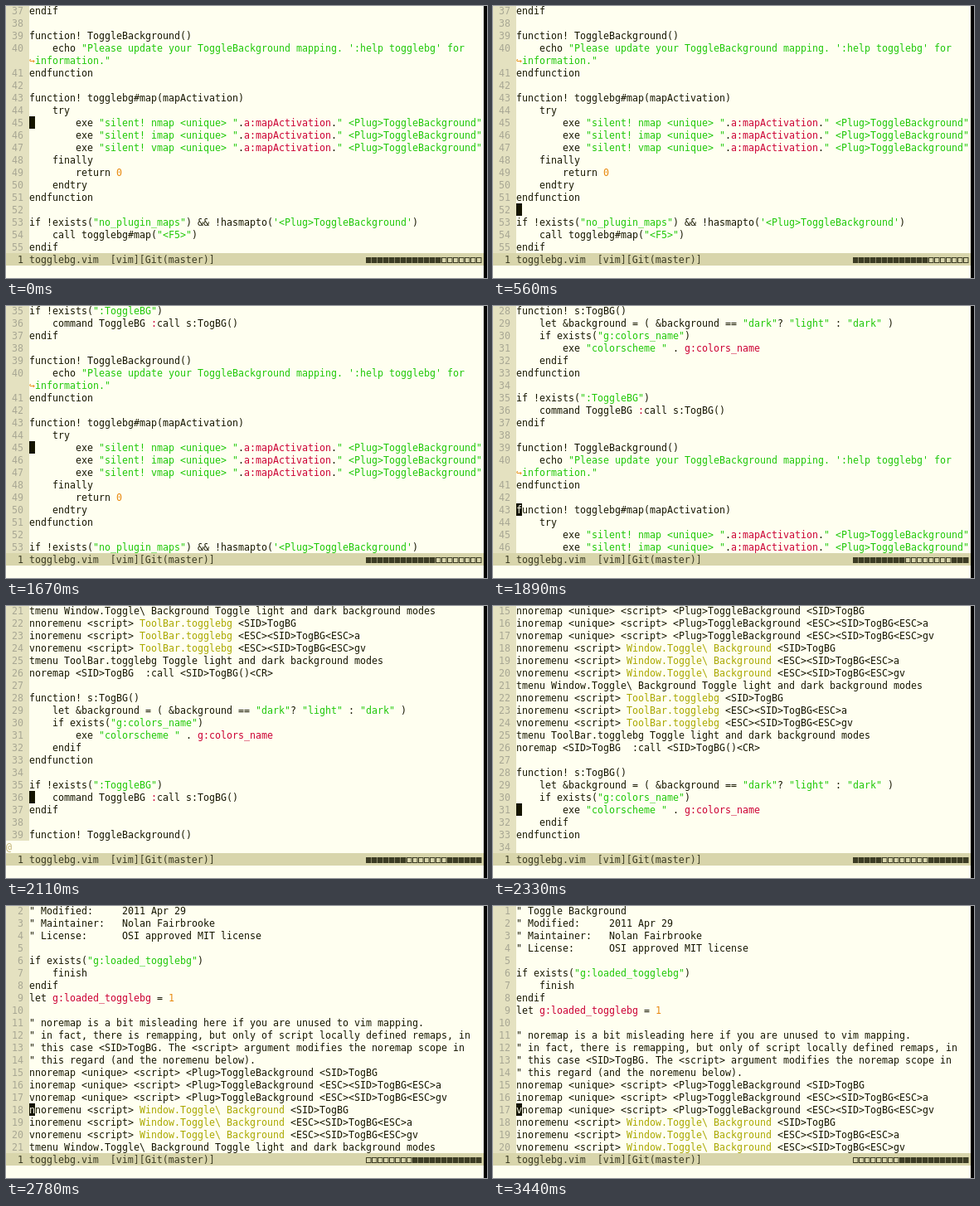
An HTML page with a canvas that plays this animation: 580x328 px, repeating every 3.55 s.

```html
<!DOCTYPE html>
<html lang="en">
<head>
<meta charset="utf-8">
<style>
html, body { margin: 0; width: 100%; height: 100%; overflow: hidden; background: #fffff0; }
canvas { display: block; }
</style>
</head>
<body>
<canvas id="stage" width="580" height="328"></canvas>
<script>
const ctx = document.getElementById("stage").getContext("2d");
const LOOP = 3550, STEP = 111, ROWS = 20, CW = 7, RH = 15, LEFT = 28;
const C = {
  paper: "#fffff0", gutter: "#e4e1c0", number: "#a9a894", ink: "#161600",
  bar: "#d8d5ab", barInk: "#3c3c24", string: "#20c808", name: "#cc0033",
  menu: "#aaa800", number1: "#e88a10", cursor: "#141400"
};

const source = String.raw`" Toggle Background
" Modified:     2011 Apr 29
" Maintainer:   Nolan Fairbrooke
" License:      OSI approved MIT license

if exists("g:loaded_togglebg")
    finish
endif
let g:loaded_togglebg = 1

" noremap is a bit misleading here if you are unused to vim mapping.
" in fact, there is remapping, but only of script locally defined remaps, in
" this case <SID>TogBG. The <script> argument modifies the noremap scope in
" this regard (and the noremenu below).
nnoremap <unique> <script> <Plug>ToggleBackground <SID>TogBG
inoremap <unique> <script> <Plug>ToggleBackground <ESC><SID>TogBG<ESC>a
vnoremap <unique> <script> <Plug>ToggleBackground <ESC><SID>TogBG<ESC>gv
nnoremenu <script> Window.Toggle\ Background <SID>TogBG
inoremenu <script> Window.Toggle\ Background <ESC><SID>TogBG<ESC>a
vnoremenu <script> Window.Toggle\ Background <ESC><SID>TogBG<ESC>gv
tmenu Window.Toggle\ Background Toggle light and dark background modes
nnoremenu <script> ToolBar.togglebg <SID>TogBG
inoremenu <script> ToolBar.togglebg <ESC><SID>TogBG<ESC>a
vnoremenu <script> ToolBar.togglebg <ESC><SID>TogBG<ESC>gv
tmenu ToolBar.togglebg Toggle light and dark background modes
noremap <SID>TogBG  :call <SID>TogBG()<CR>

function! s:TogBG()
    let &background = ( &background == "dark"? "light" : "dark" )
    if exists("g:colors_name")
        exe "colorscheme " . g:colors_name
    endif
endfunction

if !exists(":ToggleBG")
    command ToggleBG :call s:TogBG()
endif

function! ToggleBackground()
    echo "Please update your ToggleBackground mapping. ':help togglebg' for ↪information."
endfunction

function! togglebg#map(mapActivation)
    try
        exe "silent! nmap <unique> ".a:mapActivation." <Plug>ToggleBackground"
        exe "silent! imap <unique> ".a:mapActivation." <Plug>ToggleBackground"
        exe "silent! vmap <unique> ".a:mapActivation." <Plug>ToggleBackground"
    finally
        return 0
    endtry
endfunction

if !exists("no_plugin_maps") && !hasmapto('<Plug>ToggleBackground')
    call togglebg#map("<F5>")
endif`.split("\n");

const rules = [
  [/"[^"]*"|'[^']*'/g, C.string],
  [/\b[ag]:\w+/g, C.name],
  [/(?<=menu <script> )(?:\\ |\S)+/g, C.menu],
  [/\b[01]$/g, C.number1],
  [/(?<=BG ):(?=call)/g, C.name]
];

// One colour per character; earlier rules win.
function colourize(text) {
  const colours = [];
  if (text[0] !== '"') {
    for (const [pattern, colour] of rules)
      for (const m of text.matchAll(pattern))
        for (let i = 0; i < m[0].length; i++) colours[m.index + i] ??= colour;
  }
  return colours;
}

const lines = source.map(text => ({
  text, colours: colourize(text), rows: text.includes("↪") ? 2 : 1
}));

const rowTop = row => row * RH - 2;

function rect(x, y, w, h, colour) {
  ctx.fillStyle = colour;
  ctx.fillRect(x, y, w, h);
}

function put(text, x, row, colour) {
  ctx.fillStyle = colour;
  ctx.fillText(text, x, row * RH + 10);
}

function drawLine({ text, colours }, row) {
  let x = LEFT;
  [...text].forEach((ch, i) => {
    if (ch === "↪") { row++; x = LEFT; }
    if (ch !== " ") put(ch, x, row, ch === "↪" ? C.number1 : colours[i] || C.ink);
    x += CW;
  });
}

function drawCursor(line, row) {
  rect(LEFT, rowTop(row), CW, RH, C.cursor);
  put(line.text[0] || " ", LEFT, row, C.paper);
}

function drawStatus(first, last) {
  rect(0, rowTop(ROWS), 576, RH, C.bar);
  put("1 togglebg.vim  [vim][Git(master)]", 14, ROWS, C.barInk);
  const cells = 20, scale = cells / lines.length;
  const from = Math.floor((first - 1) * scale), to = Math.ceil(last * scale - 0.25);
  for (let i = 0; i < cells; i++) {
    const x = 434 + i * CW;
    rect(x, 303, 6.5, 7, C.barInk);
    if (i >= from && i < to) rect(x + 1, 304, 4.5, 5, C.bar);
  }
}

// The cursor sweeps the window, then the view scrolls up at key-repeat rate.
const sweep = [45, 42, 40, 44, 48, 52, 49, 45, 42, 40, 45];

function topLine(step) {
  if (step < 13) return 37;
  if (step < 15) return 36;
  return Math.max(1, Math.floor(35 - 3.28 * (step - 15)));
}

function draw(time) {
  const step = Math.min(31, Math.floor((time + 5) / STEP));
  const top = topLine(step);
  const rowOf = {};
  let row = 0, n = top;
  rect(0, 0, 580, 328, C.paper);
  while (n <= lines.length && row + lines[n - 1].rows <= ROWS) {
    const line = lines[n - 1];
    rect(0, rowTop(row), LEFT, RH * line.rows, C.gutter);
    put(String(n).padStart(2), 7, row, C.number);
    drawLine(line, row);
    rowOf[n++] = row;
    row += line.rows;
  }
  if (row < ROWS) put("@", 0, row, "#c0b070");
  const last = n - 1;
  const current = sweep[step] ?? Math.min(45, last - 3);
  if (step !== 11 && step !== 12) drawCursor(lines[current - 1], rowOf[current]);
  drawStatus(top, last);
  rect(576, 0, 4, 328, "#000");
}

ctx.font = '11.628px "DejaVu Sans Mono", monospace';
const start = performance.now();
function tick() {
  draw((performance.now() - start) % LOOP);
  requestAnimationFrame(tick);
}
tick();
</script>
</body>
</html>
```
